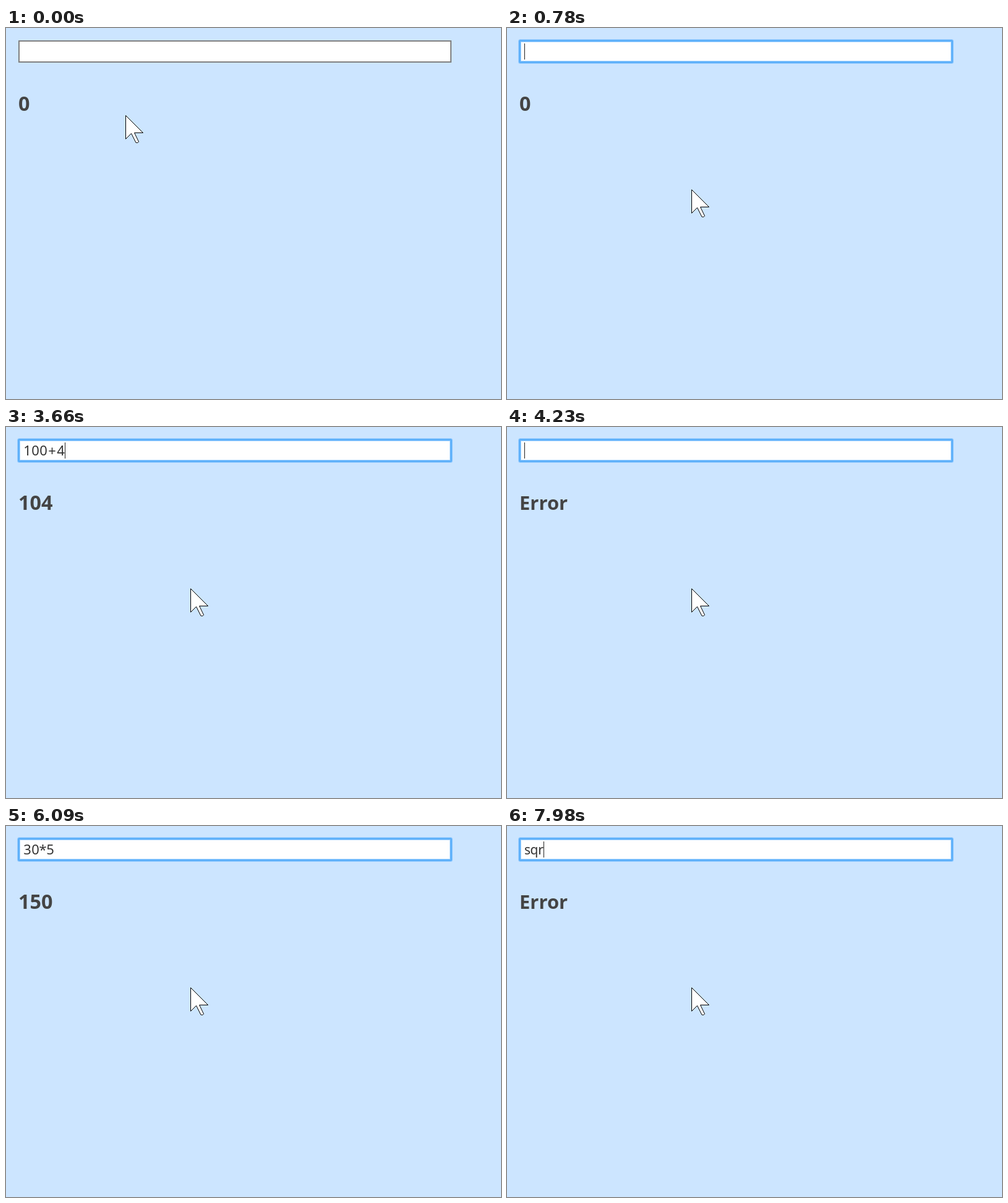
An HTML page for the animation above (8 s loop, 800x600 px).

```html
<!DOCTYPE html>
<html lang="en">
<head>
<meta charset="utf-8">
<title>Calculator</title>
<style>
  html, body { margin: 0; width: 100%; height: 100%; overflow: hidden; background: #cce5ff; }
  svg { display: block; width: 800px; height: 600px; }
  text { font-family: "Noto Sans", "Open Sans", sans-serif; }
  #entry { font-size: 22px; fill: #333; text-anchor: middle; }
  #entry.word { font-size: 21px; }
  #result { font-size: 32.4px; font-weight: 700; fill: #444; }
  #result.word { font-size: 31px; }
</style>
</head>
<body>
<svg viewBox="0 0 800 600">
  <rect width="800" height="600" fill="#cce5ff"/>
  <rect x="21" y="21" width="698" height="34" fill="#fff" stroke="#808080" stroke-width="2"/>
  <g id="ring" fill="none">
    <rect x="20.5" y="20.5" width="699" height="35" rx="1" stroke="#a3d2ff" stroke-width="5"/>
    <rect x="20.5" y="20.5" width="699" height="35" rx="1" stroke="#5fb1fa" stroke-width="3"/>
  </g>
  <text id="entry" y="46"></text>
  <rect id="caret" y="25" width="1" height="26" fill="#222"/>
  <text id="result" x="20" y="134"></text>
  <path id="arrow" d="M.5.5V38.5L9.5 29.5L17 44.5H20L21.5 43L14.5 28.5H28.5Z" fill="#fff" stroke="#000"/>
  <g id="beam" fill="none" stroke="#000">
    <path d="M0 -16V16" stroke-width="3"/>
    <path d="M-6.5 -17H-3Q0 -17 0 -14Q0 -17 3 -17H6.5M-6.5 17H-3Q0 17 0 14Q0 17 3 17H6.5" stroke-width="2"/>
  </g>
</svg>
<script>
const LOOP = 8000, TICK = 30, BLINK = 540, FOCUS = 540, LEFT = 28;
const ADVANCE = { '+': 15, '*': 11, s: 10, q: 12, r: 9 };

// time, typed text, shown result
const STATES = [
  [0, '', '0'],
  [1590, '1', '1'], [1680, '10', '10'], [1740, '10', '100'], [1770, '100', '100'],
  [2040, '100+', 'Error'], [2340, '100+4', '104'], [2520, '100+45', '145'],
  [3630, '100+45', '104'], [3660, '100+4', '104'],
  [4110, '100+', 'Error'], [4140, '100', '100'], [4170, '10', '10'], [4200, '1', '1'],
  [4230, '', 'Error'], [4620, '3', '3'], [4800, '3', '30'], [4830, '30', '30'],
  [5190, '30', 'Error'], [5220, '30*', 'Error'], [5550, '30*5', '150'],
  [6690, '30*', 'Error'], [7140, '30*', '30'], [7170, '30', '30'],
  [7200, '3', '3'], [7230, '', 'Error'],
  [7500, 's', 'Error'], [7710, 'sq', 'Error'], [7980, 'sqr', 'Error']
];

// pointer hot spot: start, end, from, to
const MOVES = [
  [0, 210, [193, 141], [155.5, 75]],
  [360, 540, [155.5, 75], [170.5, 73]],
  [540, 780, [170.5, 73], [298, 261]]
];

const [ring, entry, caret, result, arrow, beam] =
  ['ring', 'entry', 'caret', 'result', 'arrow', 'beam'].map(id => document.getElementById(id));
const show = (el, on) => el.setAttribute('visibility', on ? 'visible' : 'hidden');
const ease = p => p * p * (3 - 2 * p);

function pointerAt(t) {
  const tick = Math.floor(t / TICK) * TICK;
  const [start, end, from, to] = MOVES.filter(m => m[0] <= tick).pop();
  const p = ease(Math.min(1, (tick - start) / (end - start)));
  return from.map((v, i) => v + (to[i] - v) * p);
}

function drawPointer(t) {
  const [x, y] = pointerAt(t);
  const overField = y < 80;
  show(beam, overField);
  show(arrow, !overField);
  if (overField) beam.setAttribute('transform', `translate(${Math.floor(x) + 0.5} ${Math.round(y)})`);
  else arrow.setAttribute('transform', `translate(${Math.round(x)} ${Math.round(y)})`);
}

function drawText(t) {
  const past = STATES.filter(s => s[0] <= t);
  const [, typed, value] = past[past.length - 1];
  let end = LEFT;
  const centers = [...typed].map(c => {
    const w = ADVANCE[c] || 13;
    end += w;
    return end - w / 2;
  });
  entry.setAttribute('x', centers.join(' ') || LEFT);
  entry.setAttribute('class', /[a-z]/.test(typed) ? 'word' : '');
  entry.textContent = typed;
  result.setAttribute('class', value === 'Error' ? 'word' : '');
  result.textContent = value;

  // the blink restarts on every edit
  let edited = FOCUS;
  past.forEach((s, i) => { if (i && s[1] !== past[i - 1][1]) edited = s[0]; });
  caret.setAttribute('x', end);
  show(caret, t >= FOCUS && Math.floor((t - edited) / BLINK) % 2 === 0);
  show(ring, t >= FOCUS);
}

function frame() {
  const t = performance.now() % LOOP;
  drawPointer(t);
  drawText(t);
  requestAnimationFrame(frame);
}
frame();
</script>
</body>
</html>
```
